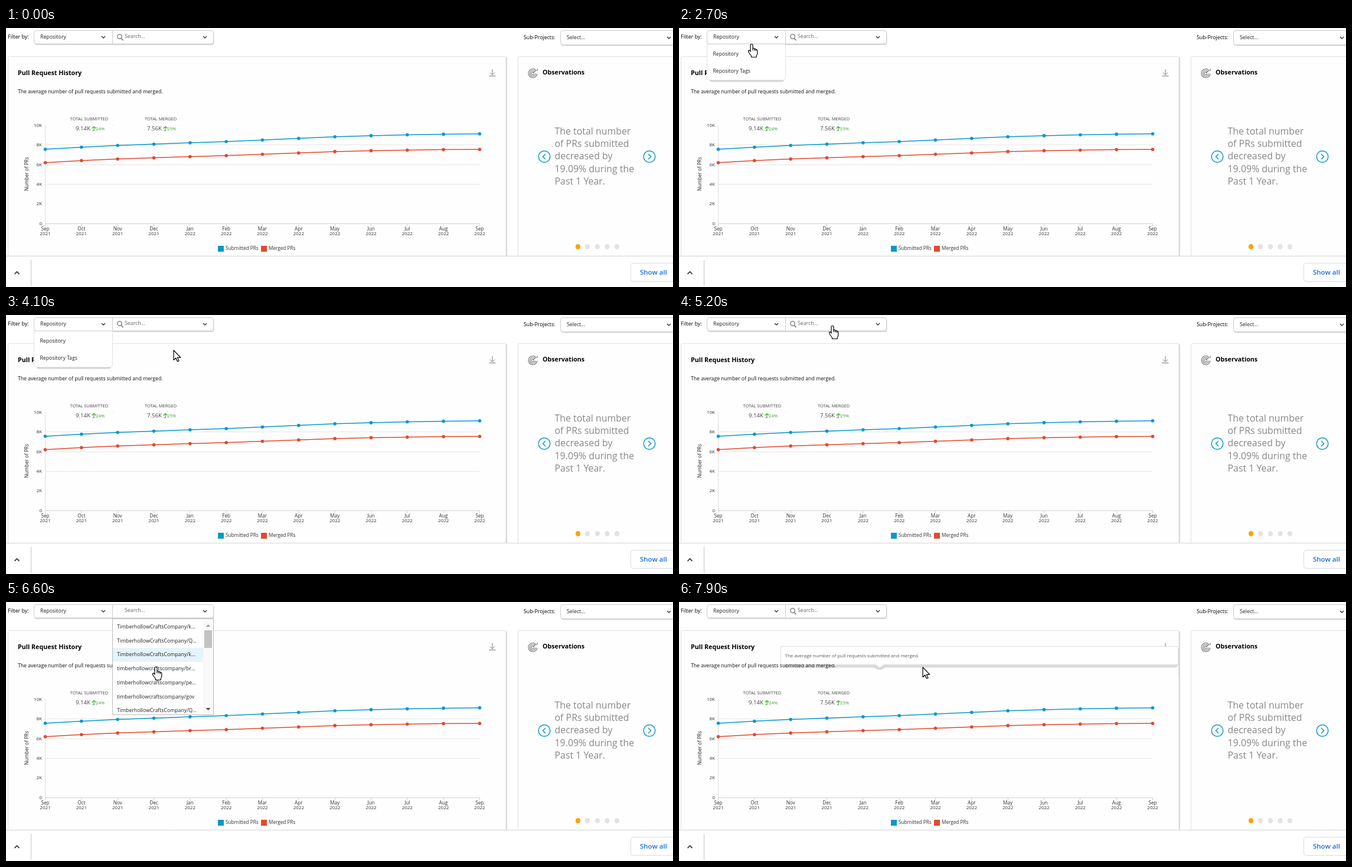
Recreate the animation shown at these times as an HTML page with a canvas. Size 1130 px wide and 440 px high, loop 8 s.

```html
<!DOCTYPE html>
<html lang="en">
<head>
<meta charset="utf-8">
<title>Pull request dashboard</title>
<style>
html, body { margin: 0; width: 100%; height: 100%; overflow: hidden; background: #fff; }
canvas { display: block; }
</style>
</head>
<body>
<canvas id="stage" width="1130" height="440"></canvas>
<script>
const ctx = document.getElementById('stage').getContext('2d');
const LOOP = 8000, STEP = 100;
const BLUE = '#0a98cc', RED = '#e2492f', INK = '#222';

const submitted = [206, 202.5, 199.5, 197.3, 195, 193, 190.3, 187.6, 184.7, 182.9, 181.5, 180.4, 179.8];
const merged = [228.7, 225.3, 222.6, 220.6, 218.6, 216.8, 214.5, 212.2, 209.9, 208.4, 207.5, 206.6, 206.2];
const months = 'Sep Oct Nov Dec Jan Feb Mar Apr May Jun Jul Aug Sep'.split(' ');
const repos = [
  'TimberhollowCraftsCompany/k...', 'TimberhollowCraftsCompany/Q...',
  'TimberhollowCraftsCompany/k...', 'timberhollowcraftscompany/br...',
  'timberhollowcraftscompany/pe...', 'timberhollowcraftscompany/gov',
  'TimberhollowCraftsCompany/Q...'
];
const ROW = 23.7, LIST_TOP = 30.5;

// Pointer stops: time, x, y, shape on the way there
const path = [
  [200, 230, -25, 'arrow'], [700, 190, 46, 'arrow'], [1100, 150, 28, 'hand'],
  [1200, 150, 28, 'hand'], [1400, 147, 24, 'hand'], [1500, 147, 24, 'hand'],
  [1600, 143, 18, 'hand'], [1700, 146, 21, 'hand'], [2000, 146, 21, 'hand'],
  [2400, 134, 25, 'hand'], [2600, 134, 25, 'hand'], [2700, 123, 27, 'hand'],
  [3000, 96, 42, 'hand'], [3200, 96, 42, 'hand'], [3300, 93, 48, 'hand'],
  [3400, 93, 48, 'hand'], [3800, 120, 76, 'hand'], [4000, 120, 76, 'hand'],
  [4100, 284, 60, 'arrow'], [4200, 287, 58, 'arrow'], [4400, 287, 58, 'arrow'],
  [4700, 280, 48, 'arrow'], [4800, 280, 48, 'arrow'], [5200, 260, 18, 'hand'],
  [5600, 260, 18, 'hand'], [6000, 252, 44, 'hand'], [6100, 252, 44, 'hand'],
  [6200, 248, 61, 'hand'], [7000, 260, 158, 'hand'], [7100, 260, 161, 'hand'],
  [7200, 260, 161, 'hand'], [7900, 413, 111, 'arrow']
];

function pointerAt(t) {
  if (t <= path[0][0]) return null;
  const i = path.findIndex(p => p[0] >= t);
  if (i < 0) return path[path.length - 1].slice(1);
  const a = path[i - 1], b = path[i], k = (t - a[0]) / (b[0] - a[0]);
  return [a[1] + (b[1] - a[1]) * k, a[2] + (b[2] - a[2]) * k, b[3]];
}

function text(str, x, y, size, color = INK, align = 'left', weight = 400) {
  ctx.font = `${weight} ${size}px "Open Sans", sans-serif`;
  ctx.textAlign = align;
  ctx.fillStyle = color;
  ctx.fillText(str, x, y);
}

function rect(x, y, w, h, color) {
  ctx.fillStyle = color;
  ctx.fillRect(x, y, w, h);
}

function box(x, y, w, h, r, fill, stroke) {
  ctx.beginPath();
  ctx.roundRect(x, y, w, h, r);
  if (fill) { ctx.fillStyle = fill; ctx.fill(); }
  if (stroke) { ctx.strokeStyle = stroke; ctx.lineWidth = 1; ctx.stroke(); }
}

function line(points, color, width = 1) {
  ctx.beginPath();
  points.forEach(([x, y]) => ctx.lineTo(x, y));
  ctx.strokeStyle = color;
  ctx.lineWidth = width;
  ctx.stroke();
}

function arc(x, y, r, color, width, from = 0, to = Math.PI * 2) {
  ctx.beginPath();
  ctx.arc(x, y, r, from, to);
  ctx.strokeStyle = color;
  ctx.lineWidth = width;
  ctx.stroke();
}

function dot(x, y, rx, ry, color) {
  ctx.beginPath();
  ctx.ellipse(x, y, rx, ry, 0, 0, Math.PI * 2);
  ctx.fillStyle = color;
  ctx.fill();
}

function poly(points, color) {
  ctx.beginPath();
  points.forEach(([x, y]) => ctx.lineTo(x, y));
  ctx.fillStyle = color;
  ctx.fill();
}

function chevron(x, y) {
  line([[x - 3, y - 1.5], [x, y + 1.5], [x + 3, y - 1.5]], '#333', 1.4);
}

function drawFilters(listOpen) {
  text('Filter by:', 3, 18, 9, '#000');
  box(48.5, 6, 304, 23, 4, '#d9d9d9');
  box(47.5, 4.5, 133, 22.5, [4, 0, 0, 4], '#fff', '#ccc');
  box(180.5, 4.5, 171, 22.5, [0, 4, 4, 0], '#fff', '#ccc');
  text('Repository', 58, 18, 8.8);
  chevron(165, 15.5);
  text('Search...', 201, 17, 8.8, '#666');
  chevron(337, 15.5);
  if (!listOpen) {
    arc(192.5, 14.5, 3.7, '#888', 1.5);
    line([[195, 17.5], [198.5, 21]], '#888', 1.8);
  }
  text('Sub-Projects:', 877, 19, 8.8, '#000');
  box(940, 6, 200, 24.5, 4, '#d9d9d9');
  box(939.5, 4.5, 200, 24, 4, '#fff', '#ccc');
  text('Select...', 950, 19, 8.8);
  chevron(1123, 16.5);
}

function drawCards() {
  rect(847, 50, 2, 340, '#d6d6d6');
  box(3.5, 48.5, 843.5, 360, 2, '#fefefe', '#e0e0e0');
  box(867.5, 48.5, 280, 360, 2, '#fefefe', '#e0e0e0');
  text('Pull Request History', 20, 80, 10.7, '#000', 'left', 700);
  text('The average number of pull requests submitted and merged.', 20, 111, 8.67, '#111');
  line([[824, 70], [824, 79.5]], '#777');
  line([[820, 75.5], [824, 79.5], [828, 75.5]], '#777');
  line([[818.5, 81.5], [829.5, 81.5]], '#777');
}

function drawStat(title, value, change, x, valueX) {
  text(title, x, 156.5, 7.45, '#444');
  text(value, valueX, 173.5, 9.6, '#444');
  text(change, valueX + 34, 173.5, 7.7, '#3fa535');
  const ax = valueX + 31;
  line([[ax - 3.5, 170.5], [ax, 167.5], [ax + 3.5, 170.5]], '#3fa535', 1.2);
  line([[ax, 167.5], [ax, 174.5], [ax - 2.5, 174.5]], '#3fa535', 1.2);
}

function drawSeries(values, color) {
  const pts = values.map((y, i) => [66.5 + i * 61.33, y]);
  line(pts, color, 1.5);
  pts.forEach(([x, y]) => dot(x, y, 2.8, 2.8, color));
}

function drawChart() {
  drawStat('TOTAL SUBMITTED', '9.14K', '24%', 108.5, 118);
  drawStat('TOTAL MERGED', '7.56K', '25%', 235, 239);
  rect(181, 165, 1, 1, '#ccc');
  rect(297, 165, 1, 1, '#ccc');

  [198.5, 232.5, 265.5].forEach(y => line([[66, y], [802, y]], '#e6e6e6'));
  line([[66.5, 165], [66.5, 332]], '#ddd');
  line([[66, 332.5], [803, 332.5]], '#d4d4d4');
  ['10K', '8K', '6K', '4K', '2K', '0'].forEach((s, i) =>
    text(s, 61, 168 + i * 33.3, 8, '#333', 'right'));
  months.forEach((m, i) => {
    const x = 66.5 + i * 61.33, tick = Math.floor(x) + 0.5;
    line([[tick, 332], [tick, 337]], '#d4d4d4');
    text(m, x, 344, 8.2, '#333', 'center');
    text(i < 4 ? '2021' : '2022', x, 352, 8, '#333', 'center');
  });

  ctx.save();
  ctx.translate(38, 248);
  ctx.rotate(-Math.PI / 2);
  text('Number of PRs', 0, 0, 8.2, '#222', 'center');
  ctx.restore();

  drawSeries(submitted, BLUE);
  drawSeries(merged, RED);
  rect(359, 370, 10, 10, BLUE);
  text('Submitted PRs', 372, 377, 8.2, '#333');
  rect(432, 370, 10, 10, RED);
  text('Merged PRs', 445, 377, 8.2, '#333');
}

function drawObservations() {
  [7.5, 5, 2.5].forEach(r => arc(892.5, 77, r, '#777', 1.2, 0.1, Math.PI * 1.72));
  line([[892.5, 77], [897, 72.5], [900, 72], [900.5, 69.5]], '#777', 1.2);
  text('Observations', 909, 79, 10.7, '#000', 'left', 700);

  ['The total number', 'of PRs submitted', 'decreased by', '19.09% during the', 'Past 1 Year.']
    .forEach((s, i) => text(s, 929.5, 181 + i * 21.2, 15.9, '#888'));

  [[912, -1], [1090, 1]].forEach(([x, dir]) => {
    arc(x, 218.5, 9.8, '#1199c8', 1.5);
    line([[x - 2 * dir, 214], [x + 2.5 * dir, 218.5], [x - 2 * dir, 223]], '#1199c8', 1.5);
  });
  [969, 985, 1002, 1018.5, 1035].forEach((x, i) =>
    dot(x, 371.5, 4.1, 4.6, i ? '#e3e3e3' : '#ffa200'));
}

function drawFooter() {
  rect(0, 387, 1130, 53, '#fff');
  line([[0, 387.5], [1130, 387.5]], '#d5d5d5');
  line([[14.5, 418], [18.5, 414], [22.5, 418]], '#444', 1.8);
  line([[42.5, 394], [42.5, 438]], '#c4c4c4');
  box(1058.5, 399.5, 90, 31, 4, '#fff', '#dadce0');
  text('Show all', 1074, 419, 11.5, '#1a6be0', 'left', 600);
}

function drawMenu() {
  box(52, 60, 126, 31.5, 4, '#d4d4d4');
  box(47.5, 27.5, 133, 61, [0, 0, 4, 4], '#fff', '#e2e2e2');
  text('Repository', 57.5, 47, 8.67);
  text('Repository Tags', 57.5, 76, 8.67);
}

function drawList(t) {
  const p = pointerAt(t - 200);
  const active = Math.max(0, Math.min(6, Math.floor((p[1 + 0] - LIST_TOP) / ROW)));
  box(180.5, 28.5, 171, 163, 0, '#fff', '#bbb');
  ctx.save();
  ctx.beginPath();
  ctx.rect(181, 29, 170, 162);
  ctx.clip();
  rect(181, LIST_TOP + active * ROW, 153, ROW, '#e6f3fa');
  repos.forEach((s, i) => text(s, 188, 45 + i * ROW, 8.7));
  ctx.restore();
  rect(334, 30, 17, 161, '#f9f9f9');
  rect(336, 48, 13, 30, '#c3c3c3');
  poly([[338.5, 42], [342.5, 38], [346.5, 42]], '#a0a0a0');
  poly([[338.5, 180], [346.5, 180], [342.5, 184]], '#444');
}

function drawTooltip() {
  rect(172, 75, 675, 31, '#fff');
  ctx.save();
  ctx.globalCompositeOperation = 'multiply';
  poly([[176, 106], [847, 106], [842, 111.5], [349, 111.5], [344, 115], [336, 115], [330, 111.5], [180, 111.5]], '#dcdcdc');
  ctx.restore();
  rect(846, 79, 3, 51, '#dadada');
  line([[172.5, 106], [172.5, 75.5], [845.5, 75.5], [845.5, 106]], '#dedede');
  poly([[333, 106], [347, 106], [340, 111]], '#fff');
  text('The average number of pull requests submitted and merged.', 179.5, 94, 8, '#555');
}

const shapes = {
  hand: new Path2D('M-2 1.5Q0-1 2 1.5V7.5Q4.4 6.3 4.8 8.7Q7 7.4 7.4 9.8Q9.8 9 9.8 12V16Q9.8 18 8.2 20V22.5H-.5V20.5L-4.8 14.5Q-6.4 11.5-4.8 11Q-3.3 10.7-2 13Z'),
  arrow: new Path2D('M0 0V16.5L3.8 13L6.4 19L9 17.9L6.4 12.1H11.8Z')
};
const knuckles = new Path2D('M2 7.5V11M4.8 8.7V11.5M7.4 9.8V12');

function drawPointer(t) {
  const p = pointerAt(t);
  if (!p) return;
  const [x, y, kind] = p;
  ctx.save();
  ctx.translate(Math.round(x), Math.round(y));
  ctx.lineJoin = 'round';
  ctx.lineWidth = 1.2;
  ctx.strokeStyle = '#000';
  ctx.fillStyle = '#fff';
  ctx.fill(shapes[kind]);
  ctx.stroke(shapes[kind]);
  if (kind === 'hand') ctx.stroke(knuckles);
  ctx.restore();
}

function draw(now) {
  const t = Math.floor((now % LOOP) / STEP) * STEP;
  const within = (from, to) => t >= from && t < to;
  const listOpen = within(5400, 7500);
  rect(0, 0, 1130, 440, '#fff');
  drawCards();
  drawChart();
  drawObservations();
  drawFilters(listOpen);
  if (within(2200, 4500)) drawMenu();
  if (listOpen) drawList(t);
  if (within(7700, LOOP)) drawTooltip();
  drawFooter();
  drawPointer(t);
}

const start = performance.now();
function loop() {
  draw(performance.now() - start);
  requestAnimationFrame(loop);
}
loop();
</script>
</body>
</html>
```
